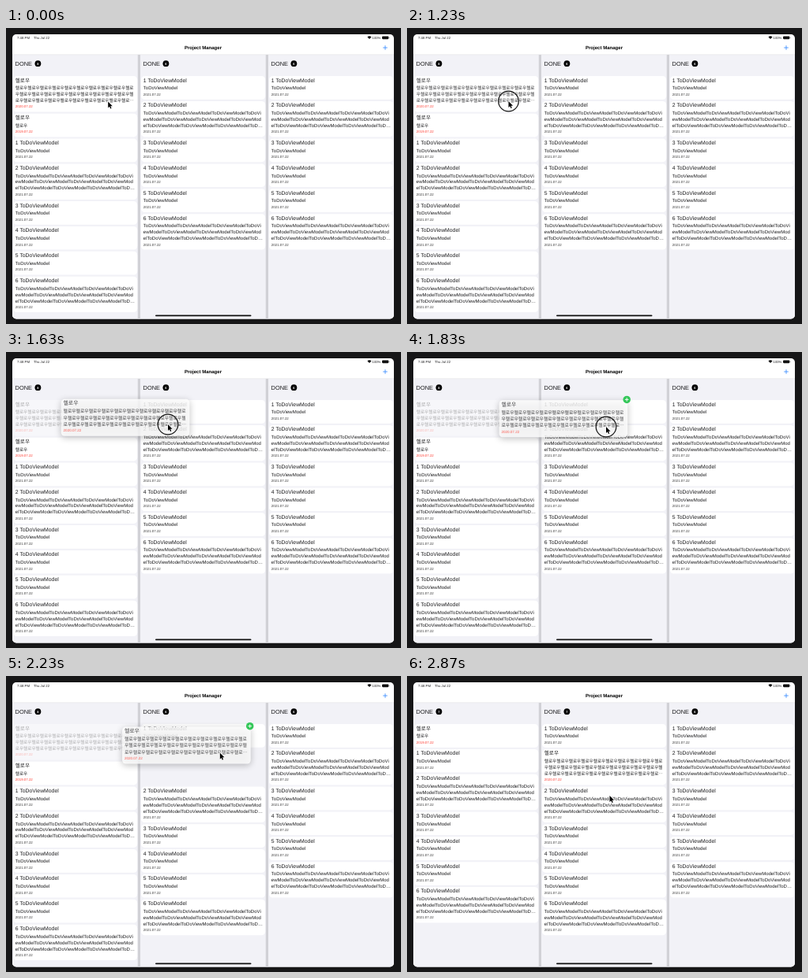
An HTML page with a canvas for the animation above (2.92 s loop, 500x376 px).

```html
<!DOCTYPE html>
<html lang="ko">
<head>
<meta charset="utf-8">
<style>
  html, body { margin: 0; overflow: hidden; background: #161617; }
  canvas { display: block; }
</style>
</head>
<body>
<canvas id="stage" width="500" height="376"></canvas>
<script>
const ctx = document.getElementById('stage').getContext('2d');
ctx.textRendering = 'geometricPrecision';

const LOOP = 2920, LIFT = 1230, ACCEPT = 1780, SHIFT = 1870, DROP = 2280;
const FONT = '"Liberation Sans", "Noto Sans CJK KR", "Noto Sans CJK", sans-serif';
const COLS = [8, 170, 332], COL_W = 158.8, TOP = 60;
const SMALL = 31.85, LINE = 7.9, LARGE = SMALL + 2 * LINE;
const GRAB = { x: 128.5, y: 93 };

const clamp = u => Math.max(0, Math.min(1, u));
const smooth = u => u * u * (3 - 2 * u);
const mix = (a, b, u) => a + (b - a) * u;
const progress = (t, start, length) => smooth(clamp((t - start) / length));

// Each row: time, x, y of the pointer tip
const PATH = [
  [0, 129.2, 93.5], [79, 129.2, 93.5], [80, 128.5, 93], [1230, 128.5, 93],
  [1330, 137, 95], [1430, 158.5, 95], [1630, 205, 92], [1830, 252, 95],
  [1930, 269, 97], [2030, 270.5, 97], [2330, 271, 98], [2430, 272, 100],
  [2530, 272, 110], [2630, 270, 125], [2730, 267, 142], [2820, 261.5, 152.5],
  [2870, 236.5, 150], [2920, 236.5, 150]
];

function pointerAt(t) {
  const i = Math.max(1, PATH.findIndex(p => p[0] >= t));
  const [t0, x0, y0] = PATH[i - 1], [t1, x1, y1] = PATH[i];
  const u = clamp((t - t0) / (t1 - t0));
  return { x: mix(x0, x1, u), y: mix(y0, y1, u) };
}

const word = 'ToDoViewModel', run = word.repeat(12);
const longBody = [run.slice(0, 45), run.slice(45, 89), run.slice(89, 133) + '…'];
const hello = '헬로우', helloRun = hello.repeat(30);
const helloBody = [helloRun.slice(0, 29), helloRun.slice(29, 58), helloRun.slice(58, 86) + '⋯'];

const todos = [1, 2, 3, 4, 5, 6].map(n => ({
  title: `${n} ${word}`, body: n === 2 || n === 6 ? longBody : [word],
  date: '2021.07.22', size: 6.85, bodySize: 6
}));
const late = { size: 6.6, bodySize: 5.62, late: true, title: hello };
const dragged = { ...late, body: helloBody, date: '2020.07.22' };
const older = { ...late, body: [hello], date: '2019.07.22' };
const heightOf = item => item.body.length > 1 ? LARGE : SMALL;

function text(str, x, y, size, color = '#1c1c1e', weight = '', align = 'left') {
  ctx.font = `${weight} ${size}px ${FONT}`;
  ctx.textAlign = align;
  ctx.fillStyle = color;
  ctx.fillText(str, x, y);
}

function roundRect(x, y, w, h, r, color) {
  ctx.beginPath();
  ctx.roundRect(x, y, w, h, r);
  ctx.fillStyle = color;
  ctx.fill();
}

function disc(x, y, r, color) {
  ctx.beginPath();
  ctx.arc(x, y, r, 0, 7);
  ctx.fillStyle = color;
  ctx.fill();
}

function plus(x, y, r, color, width) {
  ctx.beginPath();
  ctx.moveTo(x - r, y); ctx.lineTo(x + r, y);
  ctx.moveTo(x, y - r); ctx.lineTo(x, y + r);
  ctx.strokeStyle = color;
  ctx.lineWidth = width;
  ctx.stroke();
}

function card(item, x, y, alpha = 1, shadow = 0) {
  ctx.save();
  ctx.globalAlpha = alpha;
  ctx.shadowColor = `rgba(0,0,0,${0.3 * shadow})`;
  ctx.shadowBlur = 9 * shadow;
  ctx.shadowOffsetY = 2 * shadow;
  roundRect(x + 1, y + 1.1, COL_W - 1.6, heightOf(item) - 2.2, 4.5, '#fff');
  ctx.shadowColor = 'transparent';
  const left = x + 3.8;
  text(item.title, left, y + 8.5, item.size);
  item.body.forEach((line, i) => text(line, left, y + 18.2 + i * LINE, item.bodySize));
  text(item.date, left, y + heightOf(item) - 6.2, 4.4, item.late ? '#ff3b30' : '#333');
  ctx.restore();
}

function column(x, count, items, alphaOf = () => 1, gapAfter = -1, gap = 0) {
  text('DONE', x + 3.6, 48, 7.4);
  disc(x + 32.4, 45.2, 3.9, '#000');
  text(count, x + 32.4, 46.6, 4, '#fff', 'bold', 'center');
  let y = TOP;
  items.forEach((item, i) => {
    card(item, x, y, alphaOf(i));
    y += heightOf(item) + (i === gapAfter ? gap : 0);
  });
}

function chrome() {
  ctx.fillStyle = '#161617';
  ctx.fillRect(0, 0, 500, 376);
  roundRect(8, 8, 483, 361.5, 5, '#fff');
  roundRect(8, 34, 483, 335.5, [0, 0, 5, 5], '#f2f2f7');
  ctx.fillStyle = '#d1d1d6';
  for (const x of COLS.slice(1)) ctx.fillRect(x - 3.2, 34, 3.2, 335.5);
  ctx.fillRect(8, 33.7, 483, 0.4);

  text('7:48 PM', 14, 13.8, 4.3);
  text('Thu Jul 22', 35, 13.8, 4.3);
  text('100%', 474.3, 13.8, 4.2, '#1c1c1e', '', 'right');
  text('Project Manager', 249.5, 27.2, 6.05, '#000', 'bold', 'center');
  plus(480, 25, 2.8, '#2e86ff', 0.8);

  // Wi-Fi fan and battery
  ctx.beginPath();
  ctx.moveTo(460, 14);
  ctx.arc(460, 14, 3.6, -Math.PI * 0.75, -Math.PI * 0.25);
  ctx.fillStyle = '#111';
  ctx.fill();
  roundRect(476, 10.6, 8.4, 3.6, 1.1, '#111');
  roundRect(484.8, 11.7, 0.7, 1.4, 0.3, '#888');
}

function ghost(t) {
  const lift = progress(t, LIFT, 200), land = progress(t, DROP, 400);
  const hold = pointerAt(Math.min(t, DROP) - 50);
  const scale = 1 + 0.035 * lift * (1 - land);
  ctx.save();
  ctx.translate(mix(hold.x, GRAB.x + COLS[1] - COLS[0], land), mix(hold.y, GRAB.y + SMALL, land));
  ctx.scale(scale, scale);
  ctx.translate(-GRAB.x, -GRAB.y);
  card(dragged, COLS[0], TOP, mix(0.82, 1, land), lift * (1 - land));
  if (t >= ACCEPT && t < DROP) {
    const x = COLS[0] + COL_W - 1.6;
    disc(x, 60.3, 4.6, '#34c759');
    plus(x, 60.3, 2.2, '#fff', 0.9);
  }
  ctx.restore();
}

function pointer(t) {
  const { x, y } = pointerAt(t);
  const ring = clamp((t - 700) / 150) * (1 - clamp((t - 2080) / 120));
  ctx.save();
  ctx.translate(x, y);
  ctx.globalAlpha = t < 740 ? 0 : ring;
  ctx.beginPath();
  ctx.arc(0, 0, 12.8, 0, 7);
  ctx.strokeStyle = '#111';
  ctx.lineWidth = 1.2;
  ctx.stroke();
  ctx.globalAlpha = 1;
  const arrow = new Path2D('M0 0V8L1.8 6.3L3 9L4.3 8.4L3.1 5.8L5.6 5.7Z');
  ctx.strokeStyle = '#fff';
  ctx.stroke(arrow);
  ctx.fillStyle = '#000';
  ctx.fill(arrow);
  ctx.restore();
}

function draw(t) {
  const dropped = t >= DROP;
  const dim = mix(1, 0.35, progress(t, LIFT, 150));
  chrome();
  if (dropped) column(COLS[0], 7, [older, ...todos]);
  else column(COLS[0], 8, [dragged, older, ...todos], i => i ? 1 : dim);
  column(COLS[1], dropped ? 7 : 6, todos, undefined, 0, LARGE * progress(t, SHIFT, 255));
  column(COLS[2], 6, todos);
  roundRect(189, 364.4, 121.5, 1.9, 1, '#111');
  if (t >= LIFT) ghost(t);
  pointer(t);
}

function frame(now) {
  const t = now % LOOP;
  draw(Math.max(0, Math.floor((t - 30) / 50) * 50 + 30));
  requestAnimationFrame(frame);
}
requestAnimationFrame(frame);
</script>
</body>
</html>
```
